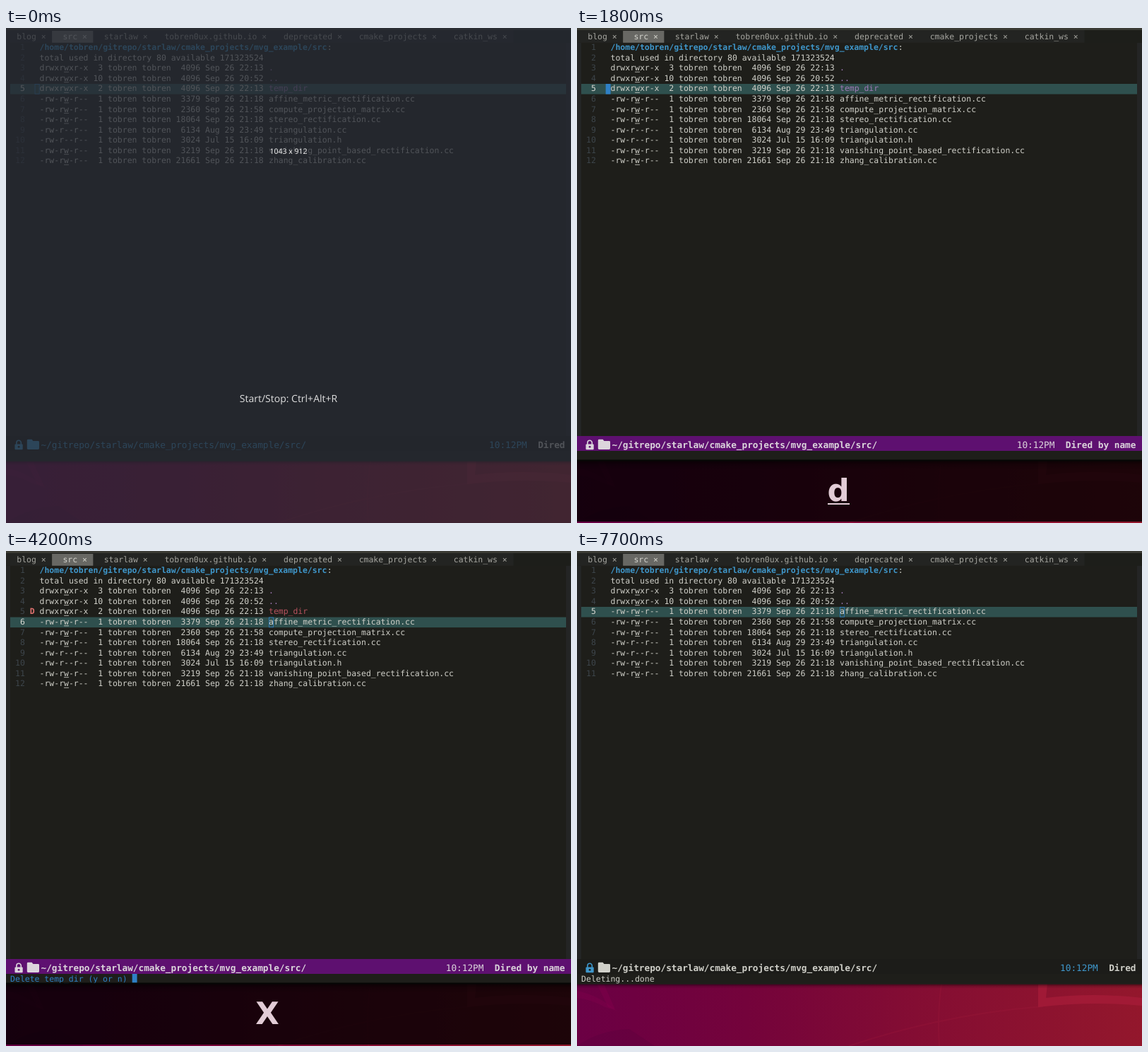
An HTML page for the animation above (7.8 s loop, 800x700 px).

```html
<!DOCTYPE html>
<html lang="en">
<head>
<meta charset="utf-8">
<title>Deleting a directory in Dired</title>
<style>
  html, body { margin: 0; width: 100%; height: 100%; overflow: hidden; background: #1e1e1a; }
  svg { display: block; width: 800px; height: 700px; }
  text { font-family: "DejaVu Sans Mono", monospace; text-rendering: geometricPrecision; white-space: pre; }
  .b { font-weight: bold; }
  .keys { font: bold 43.5px "DejaVu Sans", sans-serif; }
  .ui { font-family: "Open Sans", "Noto Sans", sans-serif; }
</style>
</head>
<body>
<svg id="stage" viewBox="0 0 800 700" xml:space="preserve">
  <defs>
    <linearGradient id="wall">
      <stop offset="0" stop-color="#6b0044"/>
      <stop offset=".3" stop-color="#74033b"/>
      <stop offset=".6" stop-color="#840d33"/>
      <stop offset="1" stop-color="#93172c"/>
    </linearGradient>
    <linearGradient id="shade" x2="0" y2="1">
      <stop offset="0" stop-color="#000" stop-opacity=".5"/>
      <stop offset=".4" stop-color="#000" stop-opacity=".18"/>
      <stop offset="1" stop-color="#000" stop-opacity="0"/>
    </linearGradient>
  </defs>
  <g id="scene"></g>
</svg>
<script>
const LOOP = 7800;
const CELL = 6.903, ROW = 14.57, TOP = 20.72, LEFT = 33.75, SIZE = 11.466;
const BAR_CELL = 7.67, BAR_SIZE = 12.74, BAR_BASE = 594, ECHO_BASE = 609, BOTTOM = 612.8;
const C = {
  bg: '#1e1e1a', fringe: '#242525', text: '#d0d0c9', dim: '#3d454b', blue: '#3f97cb',
  cursor: '#2f80c6', line: '#2f504e', dir: '#a07ab8', flag: '#e0726f', flagged: '#b9535f',
  bar: '#5e1070', barText: '#dcd5dc', key: '#e2ccd6'
};
const USER = 'tobren';
const PATH = '/gitrepo/starlaw/cmake_projects/mvg_example/src';
const TABS = ['blog', 'src', 'starlaw', USER + '0ux.github.io', 'deprecated', 'cmake_projects', 'catkin_ws'];
// mode, links, size, date, name
const FILES = [
  ['drwxrwxr-x', 3, 4096, 'Sep 26 22:13', '.'],
  ['drwxrwxr-x', 10, 4096, 'Sep 26 20:52', '..'],
  ['drwxrwxr-x', 2, 4096, 'Sep 26 22:13', 'temp_dir'],
  ['-rw-rw-r--', 1, 3379, 'Sep 26 21:18', 'affine_metric_rectification.cc'],
  ['-rw-rw-r--', 1, 2360, 'Sep 26 21:58', 'compute_projection_matrix.cc'],
  ['-rw-rw-r--', 1, 18064, 'Sep 26 21:18', 'stereo_rectification.cc'],
  ['-rw-r--r--', 1, 6134, 'Aug 29 23:49', 'triangulation.cc'],
  ['-rw-r--r--', 1, 3024, 'Jul 15 16:09', 'triangulation.h'],
  ['-rw-rw-r--', 1, 3219, 'Sep 26 21:18', 'vanishing_point_based_rectification.cc'],
  ['-rw-rw-r--', 1, 21661, 'Sep 26 21:18', 'zhang_calibration.cc']
];

const rect = (x, y, w, h, fill, more = '') =>
  `<rect x="${x}" y="${y}" width="${w}" height="${h}" fill="${fill}" ${more}/>`;
const text = (x, y, str, fill, size = SIZE, more = '') =>
  `<text x="${x}" y="${y}" fill="${fill}" font-size="${size}" ${more}>${str}</text>`;
const path = (d, fill, more = '') => `<path d="${d}" fill="${fill}" ${more}/>`;
const colX = c => LEFT + c * CELL;
const rowY = n => TOP + (n - 1) * ROW;
const baseY = n => rowY(n) + 10.48;
const BOLD = 'class="b"';

function stateAt(t) {
  const within = (a, b) => t >= a && t < b;
  const s = {
    dimmed: t < 100,
    focused: within(900, 7700),
    flagged: within(2000, 5200),
    deleted: t >= 5200,
    prompt: within(4000, 5200),
    keys: '', underline: null
  };
  s.row = within(2000, 5200) ? 6 : 5;
  s.col = t < 2000 ? 1 : 49;
  s.solid = s.focused && !s.prompt;
  s.plainBar = t < 900;
  if (within(1800, 3300)) s.keys = 'd';
  if (within(3900, 5200)) s.keys = 'X';
  if (within(5200, 6700)) s.keys = 'Xy';
  if (within(1800, 2300)) s.underline = [355, 31];
  if (within(3900, 4200)) s.underline = [353, 34];
  if (within(5200, 5400)) s.underline = [373, 27];
  return s;
}

function wallpaper(s) {
  return rect(0, 610, 800, 90, 'url(#wall)') +
    path('M0 622Q30 628 56 650L40 645Q20 634 0 632Z', '#8a0050', 'opacity=".25"') +
    path('M28 612H38L54 648L44 645Z', '#8a0050', 'opacity=".3"') +
    path('M0 700Q30 678 74 676L110 700Z', '#4c0038', 'opacity=".2"') +
    path('M385 700Q520 655 660 644M516 612Q510 655 513 700', 'none',
      'stroke="#a51c3b" stroke-width="2" opacity=".22"') +
    path('M653 612H666L664 632Q730 624 800 632V643Q730 636 653 645Z', '#a81d39', 'opacity=".72"') +
    rect(0, BOTTOM, 800, s.focused ? 12 : 6, 'url(#shade)');
}

function tabBar() {
  let out = rect(0, 0, 800, 21, '#1d1e1a') + rect(0, 3, 718.5, 17.8, '#232422') +
    rect(0, 0, 800, 3, '#3b3b35');
  let x = 15.3;
  for (const name of TABS) {
    const label = name + ' ×', w = label.length * CELL, on = name === 'src';
    if (on) out += rect(x - 15.3, 4, w + 23.7, 16.8, '#686864');
    out += text(x, 16, label, on ? '#d4d4cd' : '#a5a59f');
    x += w + 23.7;
  }
  return out;
}

function cursor(s) {
  const x = colX(s.col), y = rowY(s.row);
  return s.solid
    ? rect(x, y, CELL, ROW, C.cursor)
    : rect(x + .4, y + .4, CELL - .8, ROW - .8, 'none', `stroke="${C.cursor}" stroke-width=".8"`);
}

function listing(s) {
  const files = s.deleted ? FILES.filter(f => f[4] !== 'temp_dir') : FILES;
  const home = '/home/' + USER + PATH;
  let out = rect(6, rowY(s.row), 787, ROW, C.line) + cursor(s);
  for (let n = 1; n <= files.length + 2; n++) {
    out += text(colX(-3), baseY(n), String(n).padStart(2), n === s.row ? '#dadad4' : C.dim);
  }
  out += text(colX(2), baseY(1), home, C.blue, SIZE, BOLD) +
    text(colX(2 + home.length), baseY(1), ':', C.text) +
    text(colX(2), baseY(2), 'total used in directory 80 available 171323524', C.text);
  files.forEach(([mode, links, size, date, name], i) => {
    const n = i + 3, y = baseY(n), flagged = s.flagged && name === 'temp_dir';
    const info = `${mode} ${String(links).padStart(2)} ${USER} ${USER} ${String(size).padStart(5)} ${date}`;
    const fill = flagged ? C.flagged : mode[0] === 'd' ? C.dir : C.text;
    out += text(colX(2), y, info, C.text);
    if (mode[5] === 'w') out += rect(colX(7), y + 1.4, CELL, .8, C.text);
    if (flagged) out += text(colX(0), y, 'D', C.flag, SIZE, BOLD);
    if (s.solid && s.col === 49 && s.row === n) {
      out += text(colX(49), y, name[0], '#1c426b') + text(colX(50), y, name.slice(1), fill);
    } else {
      out += text(colX(49), y, name, fill);
    }
  });
  return out;
}

function modeLine(s) {
  const bg = s.focused ? C.bar : '#1c1c19';
  const ink = s.focused ? C.barText : C.text;
  const accent = s.focused ? ink : C.blue;
  const label = s.plainBar ? C.blue : ink;
  const mode = s.focused ? 'Dired by name' : 'Dired';
  const modeX = 791.5 - mode.length * BAR_CELL;
  const icons =
    path('M14.9 588.5V586a3.2 3.2 0 0 1 6.4 0V588.5', 'none', `stroke="${accent}" stroke-width="1.6"`) +
    rect(12.5, 588, 11.2, 7.8, accent, 'rx="1"') +
    `<circle cx="18.1" cy="591.8" r="1.4" fill="${bg}"/>` +
    path('M31.2 581.3H36.6L38.4 583.4H45.6Q47 583.4 47 584.8V594Q47 595.4 45.6 595.4H31.2Q29.8 595.4 29.8 594V582.7Q29.8 581.3 31.2 581.3Z', label);
  return rect(0, 577, 800, 21, bg) +
    `<g transform="translate(0 .5)">${icons}</g>` +
    text(49.5, BAR_BASE, '~' + PATH + '/', label, BAR_SIZE, s.plainBar ? '' : BOLD) +
    text(modeX - 9 * BAR_CELL, BAR_BASE, '10:12PM', accent, BAR_SIZE) +
    text(modeX, BAR_BASE, mode, ink, BAR_SIZE, BOLD);
}

function echoArea(s) {
  const ask = 'Delete temp_dir (y or n) ';
  if (s.prompt) {
    return text(6.1, ECHO_BASE, ask, C.cursor) +
      rect(6.1 + ask.length * CELL, 598, CELL, 12.6, C.cursor);
  }
  return s.deleted ? text(6.1, ECHO_BASE, 'Deleting...done', C.text) : '';
}

function keyPanel(s) {
  if (!s.keys) return '';
  return rect(0, 610.5, 800, 87.5, '#000', 'opacity=".8"') +
    `<text x="370" y="668.6" class="keys" text-anchor="middle" fill="${C.key}">${s.keys}</text>` +
    (s.underline ? rect(s.underline[0], 672, s.underline[1], 2, C.key) : '');
}

function recorder(s) {
  if (!s.dimmed) return '';
  const mid = 'class="ui" text-anchor="middle"';
  return rect(0, 0, 800, 700, '#262a33', 'opacity=".75"') +
    text(400, 528.6, 'Start/Stop: Ctrl+Alt+R', '#dedede', 14, mid) +
    text(400, 178, '1043 x 912', '#f2f2f2', 10.5, mid);
}

function draw(s) {
  return wallpaper(s) + rect(0, 0, 800, BOTTOM, C.bg) +
    rect(0, TOP, 6.1, 577 - TOP, C.fringe) + rect(793, TOP, 7, 577 - TOP, C.fringe) +
    tabBar() + listing(s) + modeLine(s) + echoArea(s) + keyPanel(s) + recorder(s);
}

const scene = document.getElementById('scene');
const start = performance.now();
let shown = '';

function update(t) {
  const state = stateAt(t), key = JSON.stringify(state);
  if (key === shown) return;
  shown = key;
  scene.innerHTML = draw(state);
}

function tick() {
  update((performance.now() - start) % LOOP);
  requestAnimationFrame(tick);
}
update(0);
requestAnimationFrame(tick);
</script>
</body>
</html>
```
